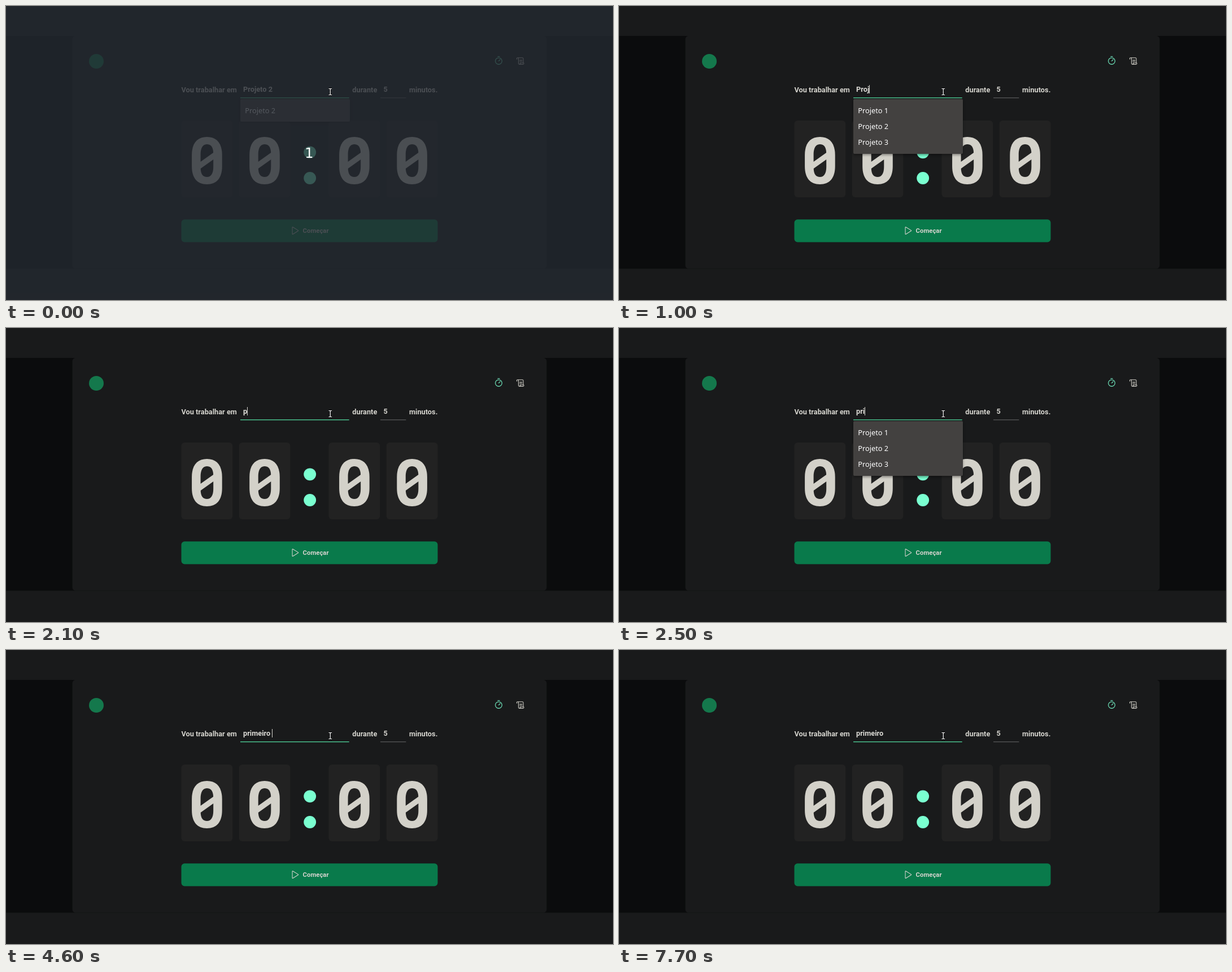
Animation of 1075 by 521 pixels, one loop 8 s. Source, as an HTML page:

```html
<!DOCTYPE html>
<html lang="pt-BR">
<head>
<meta charset="utf-8">
<title>Timer</title>
<style>
  html, body { margin: 0; width: 100%; height: 100%; overflow: hidden; background: #191a1b; }
  #stage { position: relative; width: 1075px; height: 521px; overflow: hidden; }
  #stage > * { position: absolute; }
  svg { left: 0; top: 0; display: block; }
  text, #task { font: 700 12.77px Roboto, sans-serif; }
  text { fill: #d4d3cd; }
  .icon { fill: none; stroke-width: 16; stroke-linecap: round; stroke-linejoin: round; }
  #task {
    left: 420px; top: 140px; height: 15px; line-height: 15px;
    white-space: pre; color: #dcdbd6; display: flex;
  }
  #caret { width: 1px; height: 15px; background: #d4d3cd; }
  #list {
    left: 415px; top: 164.5px; width: 193.5px; padding: 6px 0; box-sizing: border-box;
    background: #434140; border-radius: 2px; box-shadow: 0 2px 4px rgba(0, 0, 0, .4);
    font: 500 12.77px/28.4px "Noto Sans", sans-serif; color: #fff;
  }
  #list div { padding-left: 8.2px; height: 28.4px; }
  #veil { inset: 0; background: rgba(36, 41, 49, .78); }
  #count {
    left: 507px; top: 247px; width: 60px; text-align: center;
    font: 24px/28px "DejaVu Sans", sans-serif; color: #fff;
  }
</style>
</head>
<body>
<div id="stage">
  <svg width="1075" height="521">
    <defs>
      <path id="zero" fill="#d3d1c9" fill-rule="evenodd" d="
        M-26.8-10C-26.8-31-17-42 0-42S26.8-31 26.8-10V10C26.8 31 17 42 0 42S-26.8 31-26.8 10Z
        M-11.3 2V-11C-11.3-23-7-29 0-29S11-24 11.2-14Z
        M11.3-2V11C11.3 23 7 29 0 29S-11 24-11.2 14Z"/>
      <g id="digit">
        <rect x="-45.4" y="-71" width="90.8" height="136" rx="5.7" fill="#222"/>
        <use href="#zero"/>
      </g>
    </defs>

    <rect y="53" width="1075" height="412.5" fill="#0b0c0d"/>
    <rect x="117.5" y="53" width="840" height="412.5" rx="5.7" fill="#191a1b"/>
    <circle cx="160" cy="98" r="13" fill="#14784c"/>

    <g class="icon" stroke="#7affd0" transform="translate(864 89) scale(.0665)">
      <circle cx="128" cy="128" r="88"/>
      <path d="M128 128l40-40M104 8h48"/>
    </g>
    <g class="icon" stroke="#d3d1c9" transform="translate(902.8 89) scale(.0665)">
      <path d="M104 104h64M104 136h64M48 40H176a24 24 0 0 1 24 24V176
        M32 80s-8-6-8-16a24 24 0 0 1 48 0V192a24 24 0 0 0 48 0c0-10-8-16-8-16H208s8 6 8 16a24 24 0 0 1-24 24H96"/>
    </g>

    <text x="310.4" y="153">Vou trabalhar em</text>
    <text x="613.3" y="153">durante</text>
    <text x="668.6" y="152">5</text>
    <text x="714" y="153">minutos.</text>
    <rect x="415" y="162" width="192.7" height="1.4" fill="#4cc893"/>
    <rect x="663" y="162" width="45.4" height="1.4" fill="#515253"/>

    <use href="#digit" x="355.9" y="274"/>
    <use href="#digit" x="458" y="274"/>
    <use href="#digit" x="616.9" y="274"/>
    <use href="#digit" x="719.1" y="274"/>
    <g fill="#7affd0">
      <circle cx="538.2" cy="259.3" r="10.9"/>
      <circle cx="538.2" cy="305" r="10.9"/>
    </g>

    <g id="start">
      <rect x="310.5" y="378.3" width="454" height="40.2" rx="5.7" fill="#097a4b"/>
      <path class="icon" stroke="#d4d3cd" transform="translate(502.3 389.6) scale(.0665)"
        d="M72 40V216a8 8 0 0 0 12 7l144-88a8 8 0 0 0 0-14L84 33a8 8 0 0 0-12 7Z"/>
      <text x="525.6" y="402" style="font-size:11.35px">Começar</text>
    </g>
  </svg>

  <div id="task"><span id="typed"></span><span id="caret"></span></div>
  <div id="list"></div>
  <div id="veil"></div>
  <div id="count">1</div>

  <svg width="1075" height="521" fill="none">
    <path id="beam" d="M571.5 146.5h2l.8.8.8-.8h2M571.5 157.5h2l.8-.8.8.8h2M574.3 147v10" stroke="#0b0c0d" stroke-width="3"/>
    <use href="#beam" style="display:none"/>
    <path d="M571.5 146.5h2l.8.8.8-.8h2M571.5 157.5h2l.8-.8.8.8h2M574.3 147v10" stroke="#fff" stroke-width="1.2"/>
  </svg>
</div>
<script>
  const LOOP = 8000;
  const $ = id => document.getElementById(id);

  // Each track holds [start in ms, value] steps.
  const typing = [
    [0, 'Projeto 2'], [300, 'Projeto'], [600, 'Projet'], [700, 'Proje'],
    [1000, 'Proj'], [1100, 'Pro'], [1300, 'Pr'], [1800, 'P'], [1900, ''],
    [2100, 'p'], [2200, 'pr'], [2500, 'pri'], [3400, 'prim'], [3900, 'prime'],
    [4200, 'primei'], [4300, 'primeiro'], [4600, 'primeiro ']
  ];
  const caret = [[0, 0], [300, 1], [5200, 0], [5800, 1], [6400, 0], [7500, 1], [7700, 0]];
  const options = [[0, '2'], [300, '123'], [1900, ''], [2400, '123'], [2600, '']];

  const at = (track, t) => track.filter(step => step[0] <= t).pop()[1];
  const show = (id, on) => { $(id).style.visibility = on ? 'visible' : 'hidden'; };

  let shown = null;
  function draw(t) {
    const text = at(typing, t);
    const items = at(options, t);
    $('typed').textContent = text;
    if (items !== shown) {
      $('list').innerHTML = [...items].map(n => `<div>Projeto ${n}</div>`).join('');
      shown = items;
    }
    show('list', items);
    show('caret', at(caret, t));
    show('veil', t < 200);
    show('count', t < 200);
    $('start').style.opacity = text ? 1 : .7;
  }

  const begin = performance.now();
  function tick() {
    draw((performance.now() - begin) % LOOP);
    requestAnimationFrame(tick);
  }
  tick();
</script>
</body>
</html>
```
